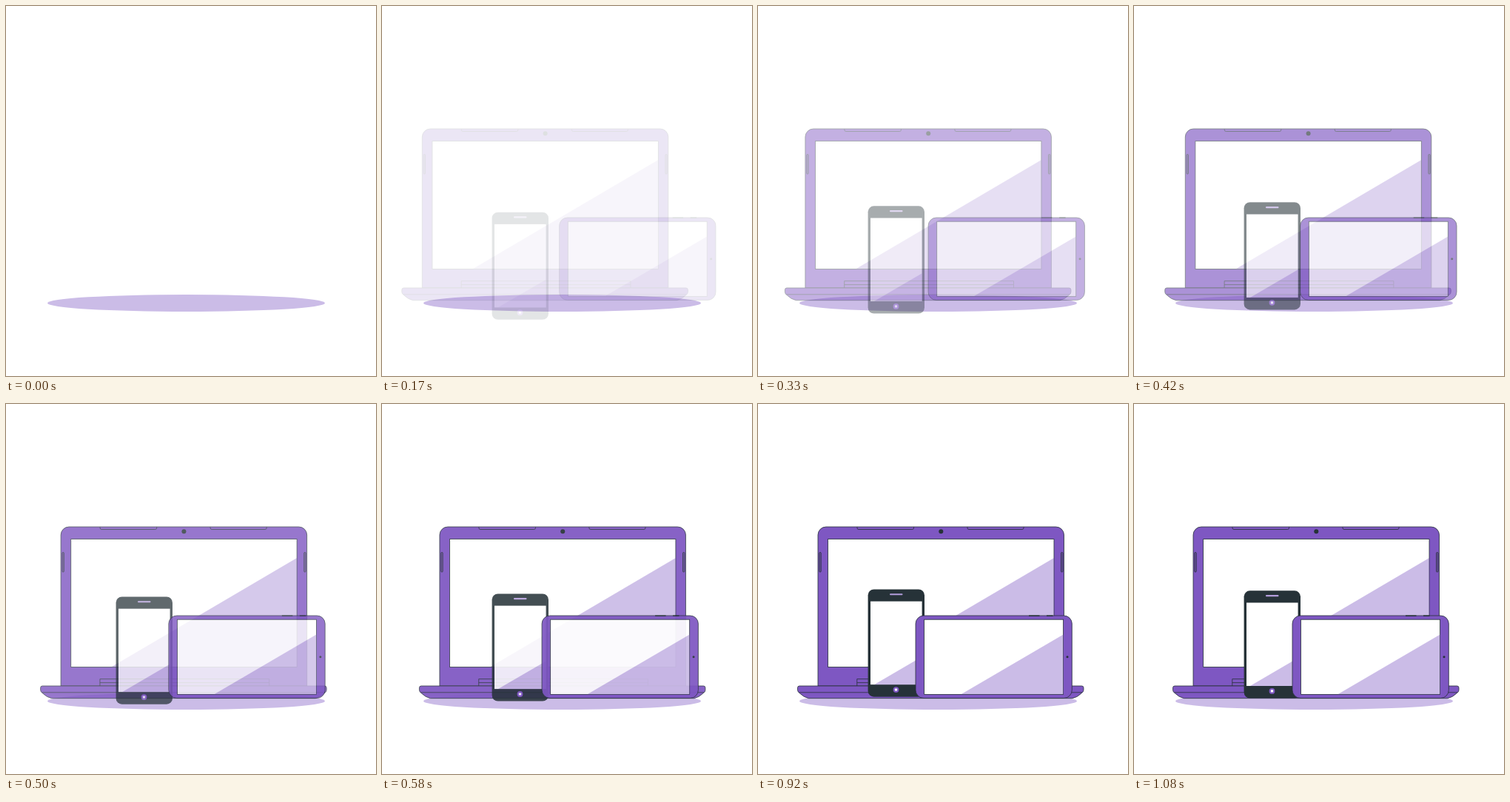
Write an HTML page that moves like this. It is 500x500 px and loops after 1.12 s.

```html
<!DOCTYPE html>
<html lang="en">
<head>
<meta charset="utf-8">
<title>Devices</title>
<style>
html, body { margin: 0; width: 100%; height: 100%; overflow: hidden; background: #fff; }
svg { display: block; width: 100vw; height: 100vh; }
.body { fill: #7e57c2; }
.dark { fill: #263238; }
.line { stroke: #263238; stroke-width: .8; }
.glare { fill: #7e57c2; fill-opacity: .4; }
.slot { fill: #263238; fill-opacity: .25; }
.none { fill: none; }
</style>
</head>
<body>
<svg viewBox="0 0 500 500">
  <ellipse class="glare" cx="243.5" cy="401.5" rx="187.5" ry="11.5"/>

  <g id="laptop" opacity="0">
    <path class="body line" d="M80 381V177a11 11 0 0 1 11-11H401.5a11 11 0 0 1 11 11V381Z"/>
    <rect class="line" x="93.6" y="182.6" width="305.4" height="172.9" fill="#fff"/>
    <path class="glare" d="M148.5 355.3L399 208V355.3Z"/>
    <circle class="dark" cx="246.3" cy="172.3" r="3"/>
    <path class="none line" d="M133 166v1.5q0 2 2 2h72.5q2 0 2-2v-1.5M282 166v1.5q0 2 2 2h72q2 0 2-2v-1.5"/>
    <rect class="slot line" x="81.8" y="200.5" width="2.4" height="26.5" rx="1"/>
    <rect class="slot line" x="408.6" y="200.5" width="2.4" height="26.5" rx="1"/>
    <path class="none line" d="M132.8 381V371.6H361.6V381M132.8 376.6H361.6"/>
    <path class="body line" d="M55 381H436.5q2.5 0 2.5 2.5v3q0 2.500-2.500 4q-6 6-12.500 7.200H67.500q-6.500-1.200-12.500-7.200q-2.500-1.500-2.500-4v-3q0-2.500 2.500-2.500Z"/>
    <path class="none line" d="M54.500 389.800H437"/>
  </g>

  <g id="phone" opacity="0">
    <rect class="dark" x="148.600" y="252.300" width="76.400" height="145.200" rx="8"/>
    <rect x="152" y="268.500" width="69.600" height="112.500" fill="#fff"/>
    <path class="glare" d="M157 381L221.600 343.300V381Z"/>
    <rect x="178" y="258" width="17.500" height="2.200" rx="1" fill="#b39ddb"/>
    <circle cx="186.500" cy="387.900" r="3.900" fill="#7e57c2"/>
    <rect x="184.900" y="386.300" width="3.200" height="3.200" rx=".8" fill="#fff"/>
  </g>

  <g id="tablet" opacity="0">
    <rect class="body line" x="214" y="286" width="211.300" height="111.500" rx="11"/>
    <rect class="line" x="225.600" y="291.200" width="188" height="101.200" fill="#fff"/>
    <path class="glare" d="M275.500 392.300L413.600 311.500V392.300Z"/>
    <circle class="dark" cx="419" cy="341.800" r="1.500"/>
    <path class="none" stroke="#263238" stroke-width="1.500" d="M367 286.200h14.500M391 286.200h8.500"/>
  </g>
</svg>
<script>
const LOOP = 1120, FRAME = 1000 / 24, TRAVEL = 30;
const parts = [
  { id: 'laptop', dx: -1, dy: 0, lead: 33, duration: 1000 },
  { id: 'phone', dx: 0, dy: 1, lead: 31, duration: 1080 },
  { id: 'tablet', dx: 1, dy: 0, lead: 33, duration: 1000 }
].map(part => ({ ...part, node: document.getElementById(part.id) }));

const bezier = (s, a, b) => 3 * (1 - s) ** 2 * s * a + 3 * (1 - s) * s * s * b + s ** 3;

function ease(x) {
  if (x >= 1) return 1;
  let low = 0, high = 1;
  for (let i = 0; i < 24; i++) {
    const mid = (low + high) / 2;
    if (bezier(mid, .36, .5) < x) low = mid; else high = mid;
  }
  return bezier(low, -.01, 1.38);
}

function draw(time) {
  const step = Math.floor((time % LOOP + 3.4) / FRAME);
  for (const { node, dx, dy, lead, duration } of parts) {
    const progress = ease((step * FRAME + lead) / duration);
    const offset = TRAVEL * (1 - progress);
    node.setAttribute('transform', `translate(${dx * offset} ${dy * offset})`);
    node.setAttribute('opacity', step < 2 ? 0 : Math.min(1, progress));
  }
}

const start = performance.now();
function tick() {
  draw(performance.now() - start);
  requestAnimationFrame(tick);
}
tick();
</script>
</body>
</html>
```
